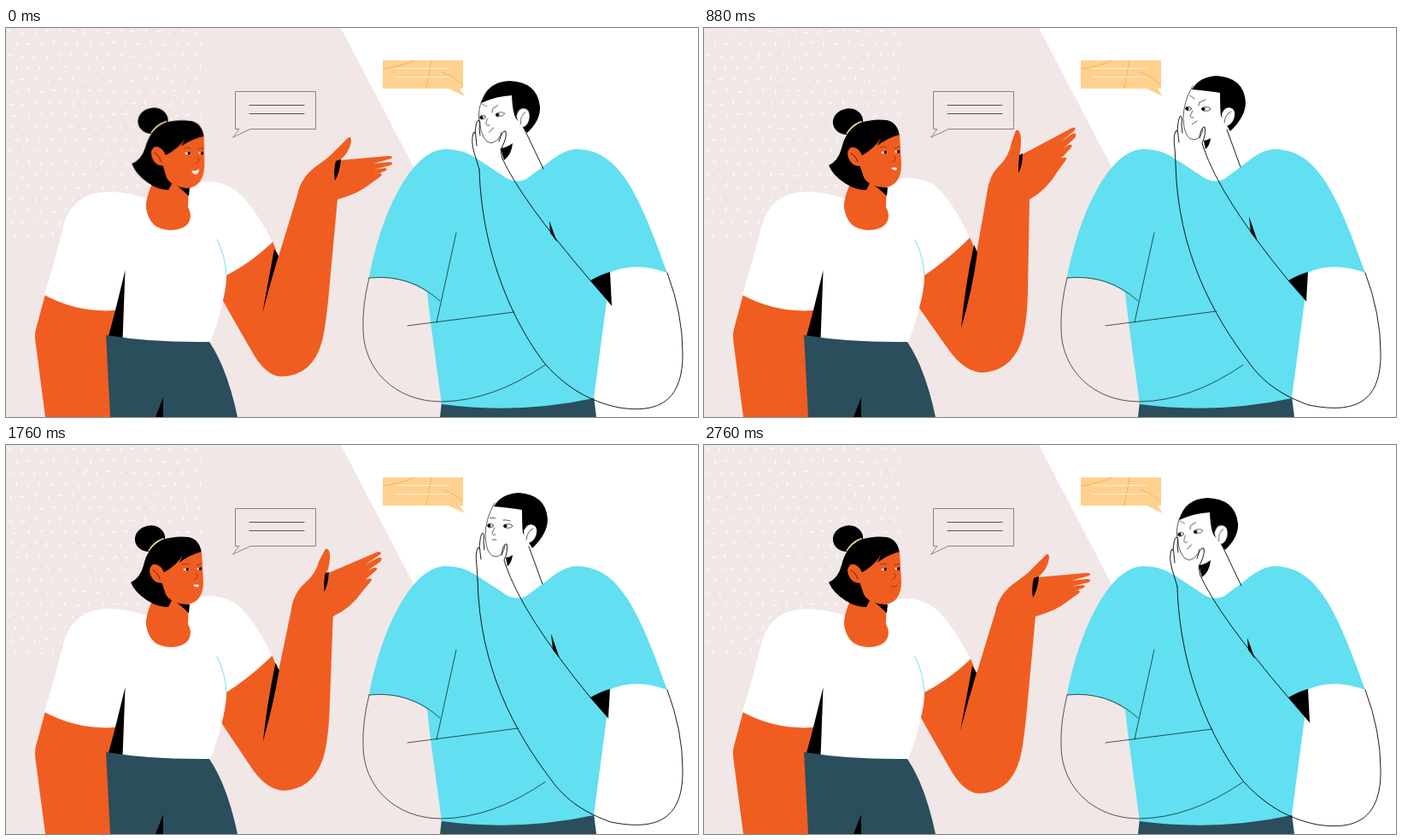
Recreate the animation shown at these times as an HTML page. Size 810 by 456 pixels, loop 3.04 s.

```html
<!DOCTYPE html>
<html lang="en">
<head>
<meta charset="utf-8">
<title>Conversation</title>
<style>
html, body { margin: 0; width: 100%; height: 100%; overflow: hidden; background: #fff; }
svg { display: block; width: 810px; height: 456px; }
.line { fill: none; stroke: #000; stroke-width: .9; stroke-linecap: round; stroke-linejoin: round; }
.thin { stroke-width: .65; }
.skin { fill: #f05d21; }
.denim { fill: #2a4e5c; }
.cyan { fill: #62dff0; }
.white { fill: #fff; }
.brown { stroke: #6b2a1c; }
</style>
</head>
<body>
<svg id="stage" viewBox="0 0 810 456">
  <path fill="#f1e7e6" d="M0 0H392L630 456H0Z"/>
  <path id="confetti" class="line" style="stroke:#fff;stroke-width:1.1"/>

  <path class="line" style="stroke:#8f716e" d="M272.5 118.5H268.5V74.5H362.5V118.5H286L266 128Z"/>
  <path class="line" style="stroke:#6a4b48;stroke-width:1" d="M285 90.5H349M285 100.5H349"/>
  <path fill="#ffd18f" d="M441 38H535V71H531L537 80L518 71H441Z"/>
  <path class="line" style="stroke:#f5b04e;stroke-linecap:butt" d="M441 48Q462 45 478 38M498 38L492 71M510 52Q524 56 535 67"/>
  <path class="line" style="stroke:#fff0da" d="M455 47.5H518M455 57.5H518"/>

  <g id="woman">
    <path class="skin" d="M46 312L35 353Q33 360 35 372L46 456H124L121 362L130 328Z"/>
    <g id="reach"></g>
    <path d="M139.5 284L128 331L120 361L136.5 365Z"/>
    <path class="denim" d="M117 360Q172 369 238 368Q259 399 271 456H122Z"/>
    <path d="M184 433L175 456H184Z"/>
    <path class="line" style="stroke:#62dff0" d="M247 248Q257 268 258 290"/>
    <path class="skin" d="M172 180Q163 200 164 211Q168 237 193 237Q216 236 216 219Q215 213 213 210L214 180Z"/>
    <path d="M195 181L215 187L214 197Q206 189 195 181Z"/>
    <g id="herHead">
      <ellipse cx="168.5" cy="109.7" rx="17.7" ry="15.3" transform="rotate(-10 168.5 109.7)"/>
      <path class="line" style="stroke:#f8d698;stroke-width:4;stroke-linecap:butt" d="M168 125Q173 115 185 110.5"/>
      <path d="M190 190Q177 190 165 182Q151 173 146 161Q157 156 161 141Q166 119 183 111Q199 106 214 108Q227 111 229 127L205 160Z"/>
      <path class="skin" d="M182 160L187 175Q193 186 212 187Q231 184 231 160L229 125Q214 129 203 138L207 129Q200 141 184 150Z"/>
      <path class="skin" d="M186 151Q180 138 172 140Q166 144 169 152Q172 162 184 162Z"/>
      <path class="line thin" d="M172 147Q178 150 180 157"/>
      <path class="white" d="M207 146Q211 143 215 146Q211 148.5 207 146ZM223 145Q226 142.5 229 145Q226 147.5 223 145Z"/>
      <circle cx="212.3" cy="145.8" r="1.8"/>
      <circle cx="227.5" cy="145" r="1.8"/>
      <path class="line thin brown" d="M206 140Q210 138 214 140M223 141L229 139M223 150Q226 156 221 157"/>
      <g id="mouths"></g>
    </g>
  </g>

  <g id="man">
    <path class="denim" d="M510 438L688 432L691 456H508Z"/>
    <path class="cyan" d="M425 293C438 222 473 142 515 142Q535 142 551 153L580 172Q595 184 609 177L632 160Q653 142 668 142C716 143 739 188 774 287Q736 273 706 287L703 320L688 434Q600 453 510 441L497 345L493 310Q465 290 425 293Z"/>
    <path class="line thin" d="M425 293Q473 288 508 320M527 240L504 345M425 293Q417 326 418 352C418 400 455 438 510 438Q570 437 631 395"/>
    <g id="fold"></g>
    <g id="profile"></g>
    <g id="hisHead">
      <path class="white" d="M606 100Q611 90 618 94Q624 99 619 109Q614 117 607 114Z"/>
      <path class="line thin" d="M606 100Q611 90 618 94M609 111Q610 101 617 98"/>
      <g id="hisEyes">
        <ellipse class="line thin" cx="587.5" cy="95" rx="5" ry="2.3"/>
        <ellipse class="line thin" cx="567" cy="94.5" rx="3.3" ry="2.3"/>
        <circle cx="584.5" cy="95" r="2.1"/>
        <circle cx="565.5" cy="94.5" r="2"/>
      </g>
      <path class="line thin" d="M572 97Q570 101 569 103Q570 106 573 105"/>
      <g id="mood"></g>
    </g>
    <g id="hand"></g>
  </g>
</svg>
<script>
const LOOP = 3040;
const LEAD = 4; // settles each step just before its tick
const $ = id => document.getElementById(id);

// Each move: [start, end, steps, 1 = second pose / 0 = first pose]
const REACH = [[240, 400, 4, 1], [1760, 1920, 4, 0]];
const TILT = [[240, 400, 4, 1]];
const LEAN = [[800, 920, 3, 1], [2640, 2800, 4, 0]];
const RELAX = [[920, 1360, 11, 1], [2640, 2800, 4, 0]];
const BLINK = [[2080, 2240, 2, 1], [2320, 2480, 2, 0]];

const at = ms => (ms - LEAD) / LOOP;

function play(el, a, b, moves) {
  let pose = a;
  const keys = [{ ...a, offset: 0 }];
  for (const [start, end, n, to] of moves) {
    keys.push({ ...pose, offset: at(start), easing: `steps(${n}, start)` });
    pose = to ? b : a;
    keys.push({ ...pose, offset: at(end) });
  }
  keys.push({ ...pose, offset: 1 });
  el.animate(keys, { duration: LOOP, iterations: Infinity });
}

function path(parent, cls, d) {
  const el = document.createElementNS('http://www.w3.org/2000/svg', 'path');
  el.setAttribute('class', cls);
  el.setAttribute('d', d);
  $(parent).append(el);
  return el;
}

function morph(parent, cls, moves, a, b) {
  play(path(parent, cls, a), { d: `path("${a}")` }, { d: `path("${b}")` }, moves);
}

// Confetti strokes on a loose grid
let seed = 11;
const rand = () => (seed = seed * 16807 % 2147483647) / 2147483647;
let dashes = '';
for (let row = 0; row < 18; row++) {
  for (let col = 0; col < 16; col++) {
    const x = 4 + col * 14.4 + (row % 2) * 6 + rand() * 3;
    const y = 3 + row * 14 + rand() * 3;
    const turn = rand() * Math.PI;
    const dx = 2.2 * Math.cos(turn), dy = 2.2 * Math.sin(turn);
    dashes += `M${x - dx} ${y - dy}L${x + dx} ${y + dy}`;
  }
}
$('confetti').setAttribute('d', dashes);

// Her raised arm, armpit shade, palm shade and shirt
morph('reach', 'skin', REACH,
  'M250 280L253 318Q268 345 286 376Q303 408 322 408.5Q359 408 370 367Q374 352 378 310L388 201Q413 194 426 183L437 175Q442 172 438 170L428 173L443 168Q448 166 444 164L430 166L450 161Q455 158 449 157L430 159L451 153Q454 150 447 150L391 155Q402 146 404 133Q404 125 399 130L385 144Q380 150 366 160Q345 174 341 196L319 268L312 250Z',
  'M250 280L251 327Q270 354 287 378Q305 403 326 404Q357 402 370 372Q378 352 379 310L381 201Q401 190 414 168L422 157Q427 151 421 152L418 153L429 141Q433 136 427 137L421 141L434 129Q438 122 431 124L417 134L434 120Q436 116 431 117L369 150Q371 143 371 130Q370 117 365 120L360 134Q357 151 345 162Q333 174 331 195L319 264L311 245Z');
morph('reach', '', REACH,
  'M314 259L319 267Q309 300 300 335Q307 297 314 259Z',
  'M316 254L320 263Q315 303 301 352Q305 305 316 254Z');
morph('reach', '', REACH,
  'M386 156L392 154Q391 169 385 179Q383 168 386 156Z',
  'M369 149L373 147Q373 162 368 170Q368 160 369 149Z');
morph('reach', 'white', REACH,
  'M45 313Q58 270 66 237Q76 190 124 192Q145 193 165 200L214 184Q254 171 280 201Q299 224 312 251Q287 275 258 290Q258 303 254 319Q248 348 238 370Q180 371 136 366L139.5 284L128 331Q84 334 45 313Z',
  'M45 313Q58 270 66 237Q76 190 124 192Q145 193 165 200L214 180Q246 170 269 184Q291 202 311 246Q286 271 258 290Q258 306 252 328Q247 350 238 370Q180 371 136 366L139.5 284L128 331Q84 334 45 313Z');

const herHead = $('herHead');
herHead.style.transformOrigin = '190px 190px';
play(herHead, { transform: 'rotate(2.5deg)' }, { transform: 'rotate(0deg)' }, TILT);

// Her mouth: one shape visible at a time
const shapes = {
  smile: ['white', 'M216 166Q221 167 225 164Q225 170 220 170Q217 169 216 166Z'],
  open: ['white', 'M219 164Q223 163 226 164L225 166.5Q221 167 219 164Z'],
  grin: ['white', 'M219 163Q222 166 226 164Q225 168 222 167.5Q220 167 219 163Z'],
  shut: ['line thin brown', 'M219 166Q223 167 226 165']
};
const speech = [
  [0, 'smile'], [280, 'open'], [440, 'shut'], [520, 'open'], [600, 'grin'],
  [680, 'shut'], [760, 'open'], [1360, 'shut'], [1440, 'grin'], [1520, 'open'],
  [1600, 'shut'], [1640, 'grin'], [1680, 'shut'], [1720, 'open'], [1800, 'shut']
];
for (const [name, [cls, d]] of Object.entries(shapes)) {
  const keys = speech.map(([ms, shown]) => ({
    opacity: shown === name ? 1 : 0,
    offset: ms ? at(ms) : 0,
    easing: 'steps(1, end)'
  }));
  keys.push({ opacity: keys[keys.length - 1].opacity, offset: 1 });
  path('mouths', cls, d).animate(keys, { duration: LOOP, iterations: Infinity });
}

// His folded arms, neck and chin shade
morph('fold', 'line', LEAN,
  'M554 166C557 270 598 352 632 395C655 420 682 438 718 445C763 452 793 438 792 380Q792 335 774 287',
  'M552 158C554 262 597 338 637 391C656 418 680 432 708 442C763 453 793 438 792 380Q792 335 774 287');
morph('fold', 'line thin', LEAN, 'M470 349L595 333', 'M470 349L600 332');
morph('fold', '', LEAN, 'M684 296Q696 289 707 286L709 325Z', 'M684 296Q696 289 707 286L705 320Z');
morph('fold', 'line', LEAN, 'M581 153Q602 200 684 296L709 325', 'M585 141Q604 198 684 296L705 320');
morph('fold', '', LEAN, 'M636 226L645 251L637 240Z', 'M638 221L648 250L640 240Z');
morph('fold', 'line', LEAN, 'M606 117L629 165', 'M612 119L628 163');
morph('fold', '', LEAN,
  'M579 141Q587 140 593 135Q592 148 583 155Z',
  'M585 132Q589 132 593 129Q592 138 587 142Z');

// His face edge and hair
morph('profile', 'line thin', LEAN,
  'M557 85Q552 97 554 109Q557 134 568 135Q578 132 580 122',
  'M572 68Q561 86 561 107Q562 131 574 131Q583 129 584 118');
morph('profile', '', LEAN,
  'M556 88Q563 63 589 62Q622 63 625 92Q626 108 610 123L597 106Q593 100 592 79Q573 80 556 88Z',
  'M571 72Q580 57 600 56Q632 58 634 87Q634 104 616 121L605 103Q604 94 604 76Q592 74 571 72Z');

const hisHead = $('hisHead');
hisHead.style.transformOrigin = '614px 104px';
play(hisHead,
  { transform: 'translate(-8px, 1px) rotate(-11deg)' },
  { transform: 'translate(0px, 0px) rotate(0deg)' }, LEAN);

const hisEyes = $('hisEyes');
hisEyes.style.transformOrigin = '577px 95px';
play(hisEyes, { transform: 'scaleY(1)' }, { transform: 'scaleY(.15)' }, BLINK);

morph('mood', 'line thin', RELAX,
  'M569 79L574 83M579 91L580 87L587 84M571 113L577 109',
  'M566 86L569 85L573 86M582 88L586 88L590 89M569 111L574 111');
morph('hand', 'line', LEAN,
  'M554 166L548 146Q544 133 547 123Q550 120 550 128L551 138M549 124Q550 109 553 108Q556 108 554 118L555 126M577 133Q581 119 585 121Q587 128 579 143L581 153',
  'M552 158L551 141Q549 128 552 121Q555 118 555 126L556 134M554 122Q555 104 558 103Q560 104 559 114L560 123M580 129Q582 115 586 116Q588 124 583 135L585 141');
</script>
</body>
</html>
```
